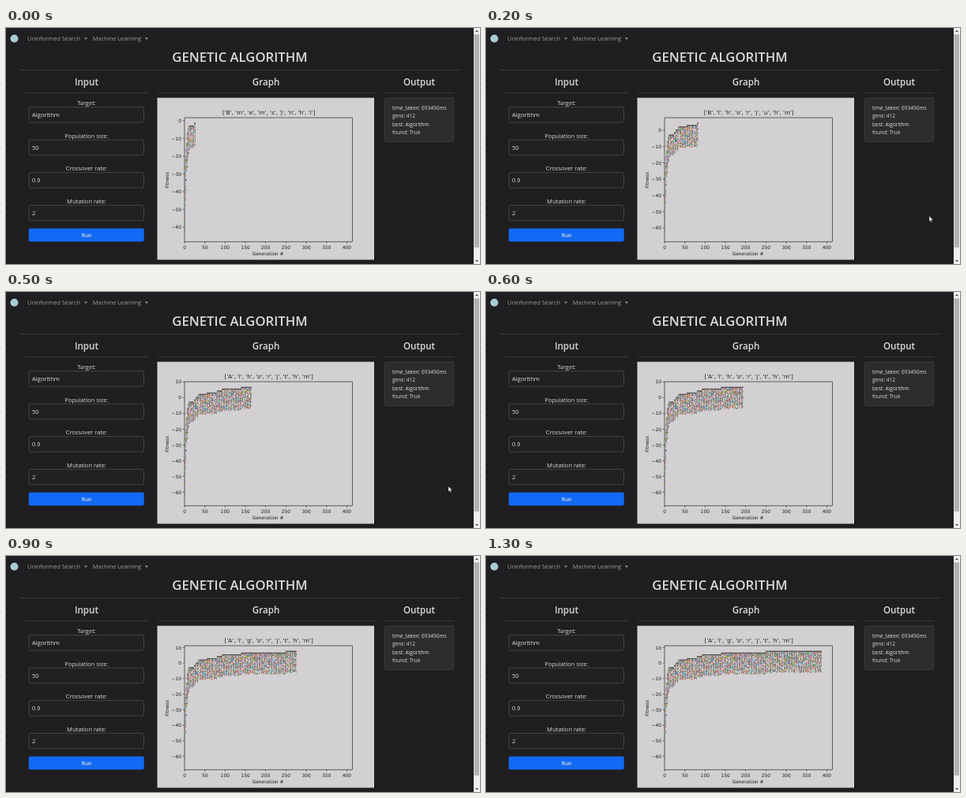
Animation of 600 by 300 pixels, one loop 1400 ms. Source, as an HTML page with a canvas:

```html
<!DOCTYPE html>
<html lang="en">
<head>
<meta charset="utf-8">
<title>Genetic Algorithm</title>
<style>
  html, body { margin: 0; width: 100%; height: 100%; overflow: hidden; background: #201e21; }
  svg, canvas { position: absolute; left: 0; top: 0; width: 600px; height: 300px; }
  text { font-family: "Open Sans", "Noto Sans", sans-serif; fill: #dcdadc; white-space: pre; }
  .plot text { font-family: "DejaVu Sans", sans-serif; fill: #1c1b1c; }
  .plot path { stroke: #2a292a; stroke-width: .7; fill: none; }
</style>
</head>
<body>
<svg id="page" viewBox="0 0 600 300"></svg>
<canvas id="dots" width="600" height="300"></canvas>
<script>
const LOOP = 1400, STEP = 100;
const LEFT = 226, RIGHT = 438.5, TOP = 114, BOTTOM = 271.7, PER_GEN = .5137, LOWEST = -65;
const page = document.getElementById('page');
const ctx = document.getElementById('dots').getContext('2d');

function add(tag, attrs, parent = page) {
  const el = document.createElementNS('http://www.w3.org/2000/svg', tag);
  for (const k in attrs) el.setAttribute(k, attrs[k]);
  return parent.appendChild(el);
}
function text(x, y, size, str, attrs = {}, parent = page) {
  const el = add('text', { x, y, 'font-size': size, ...attrs }, parent);
  el.textContent = str;
  return el;
}
const rect = (x, y, width, height, fill, attrs) => add('rect', { x, y, width, height, fill, ...attrs });
const rule = (x1, x2, y) => rect(x1, y, x2 - x1, .7, '#454346');
const mid = { 'text-anchor': 'middle' };
const heavy = { ...mid, 'font-weight': 600 };

// Navigation and headings
add('path', { d: 'M1.5 48V294', stroke: '#141315', 'stroke-width': 3, 'stroke-dasharray': '1.5 7.5' });
add('circle', { cx: 10.5, cy: 13.5, r: 5, fill: '#a9cbd3' });
[['Uninformed Search', 27, 101], ['Machine Learning', 109.7, 178]].forEach(([label, x, caret]) => {
  text(x, 15.8, 7.4, label, { style: 'fill:#a09ea1' });
  add('path', { d: `M${caret - 2.3} 12.4h4.6l-2.3 2.4z`, fill: '#a09ea1' });
});
text(296, 42.9, 16.7, 'GENETIC ALGORITHM', heavy);
rule(18, 574, 53);
[['Input', 25, 179], ['Graph', 192, 466], ['Output', 479, 567]].forEach(([label, a, b]) => {
  text((a + b) / 2, 72.5, 11.6, label, heavy);
  rule(a, b, 82);
});

// Form
[['Target:', 'Algorithm'], ['Population size:', '50'], ['Crossover rate:', '0.9'], ['Mutation rate:', '2']]
  .forEach(([label, value], i) => {
    const y = 100.5 + i * 41.6;
    text(102, y - 2.4, 7.5, label, mid);
    rect(29, y, 145.5, 19.5, '#212022', { rx: 2, stroke: '#565458', 'stroke-width': .7 });
    text(33, y + 12.6, 7.6, value);
  });
rect(28.7, 254.8, 146, 16.8, '#126af4', { rx: 2 });
text(102, 265.8, 6.6, 'Run', heavy);

// Output card and scrollbar
rect(479, 89, 87.7, 55.5, '#2d2b2e', { rx: 2, stroke: '#444245', 'stroke-width': .7 });
['time_taken: 693490ms', 'gens: 412', 'best: Algorithm', 'found: True']
  .forEach((line, i) => text(489, 104 + i * 10.3, 6.55, line));
rect(592, 0, 8, 300, '#f0eff0');
rect(592.5, 8, 6.5, 271, '#b3b2b3');
add('path', { d: 'M594 5l2-2.5 2 2.5zM594 295l2 2.5 2-2.5z', fill: '#504f50' });

// Plot
rect(191.5, 88.7, 274.5, 205.9, '#d2d0d2');
const plot = add('g', { class: 'plot' });
const heading = text(332.7, 109.6, 7.15, '', mid, plot);
add('path', { d: `M${LEFT} ${TOP}H${RIGHT}V${BOTTOM}H${LEFT}z` }, plot);
for (let g = 0; g <= 400; g += 50) {
  const x = LEFT + g * PER_GEN;
  add('path', { d: `M${x} ${BOTTOM}v2` }, plot);
  text(x, 280.6, 5.9, g, mid, plot);
}
text(331.5, 288.7, 5.9, 'Generation #', mid, plot);
text(0, 0, 5.9, 'Fitness', { ...mid, transform: 'translate(206 193.5) rotate(-90)' }, plot);
const ticks = [];
for (let v = 10; v >= -60; v -= 10) {
  const el = add('g', {}, plot);
  add('path', { d: `M${LEFT} 0h-2` }, el);
  text(222, 2.2, 5.9, v < 0 ? '\u2212' + -v : v, { 'text-anchor': 'end' }, el);
  ticks.push({ v, el });
}
const cursor = add('path', {
  d: 'M0 0v7l1.6-1.5 1.1 2.4 1.1-.5-1.1-2.3h2.2z', fill: '#fff', stroke: '#111', 'stroke-width': .4
});

// Best fitness from a generation on, and the best word from a generation on
const levels = [[0, -30], [1, -26], [2, -22], [3, -17], [4, -13], [5, -10], [7, -7], [9, -4.5], [11, -3],
  [24, -1.5], [28, 0], [35, 2], [55, 2.9], [80, 4.2], [93, 5.4], [140, 6.5], [250, 7.6]];
const words = [[0, 'Bmemsjnhl'], [35, 'Blhmrjuhm'], [80, 'Blhorjuhm'], [93, 'Alhorjuhm'],
  [140, 'Alhorjthm'], [250, 'Algorjthm']];
const at = (list, g) => list.filter(e => e[0] <= g).pop()[1];

let seed = 7;
const rnd = () => (seed = seed * 16807 % 2147483647) / 2147483647;
const colors = ['#1f77b4', '#e27a22', '#2b9a35', '#cc2c30', '#8d64b4', '#85564b', '#d873b8', '#777', '#a9aa2a', '#20b3c2'];
const dots = [];
for (let g = 0; g < 412; g++) {
  const best = at(levels, g);
  const spread = 12 + Math.min(g / 60, 1.6) + 23 * Math.exp(-g / 4);
  const count = g < 12 ? 26 : Math.floor(g * PER_GEN) % 3 ? 20 : 9;
  for (let i = 0; i < count; i++)
    dots.push({ g, v: best - spread * rnd() ** 1.15, c: colors[Math.floor(rnd() * 10)] });
  dots.push({ g, v: best, c: '#3d3c40' });
}
dots[0].v = LOWEST;

function draw(now) {
  const k = Math.floor(now % LOOP / STEP);
  const gen = 27 + 27.7 * k;
  const high = at(levels, gen), pad = (high - LOWEST) * .05;
  const scale = (BOTTOM - TOP) / (high - LOWEST + 2 * pad);
  const yOf = v => TOP + (high + pad - v) * scale;

  heading.textContent = `[${[...at(words, gen)].map(c => `'${c}'`).join(', ')}]`;
  for (const { v, el } of ticks) {
    const y = yOf(v);
    el.setAttribute('transform', `translate(0 ${y})`);
    el.style.display = y < TOP - .5 ? 'none' : '';
  }
  ctx.clearRect(0, 0, 600, 300);
  ctx.globalAlpha = .7;
  for (const { g, v, c } of dots) {
    if (g > gen) break;
    ctx.fillStyle = c;
    ctx.fillRect(Math.floor(LEFT + g * PER_GEN), yOf(v) - .5, 1, 1);
  }
  cursor.style.display = k >= 2 && k <= 5 ? '' : 'none';
  const drift = Math.min(k - 2, 2) / 2;
  cursor.setAttribute('transform', `translate(${561 - drift} ${239 + 8 * drift})`);
}
function loop() {
  draw(performance.now());
  requestAnimationFrame(loop);
}
loop();
</script>
</body>
</html>
```
